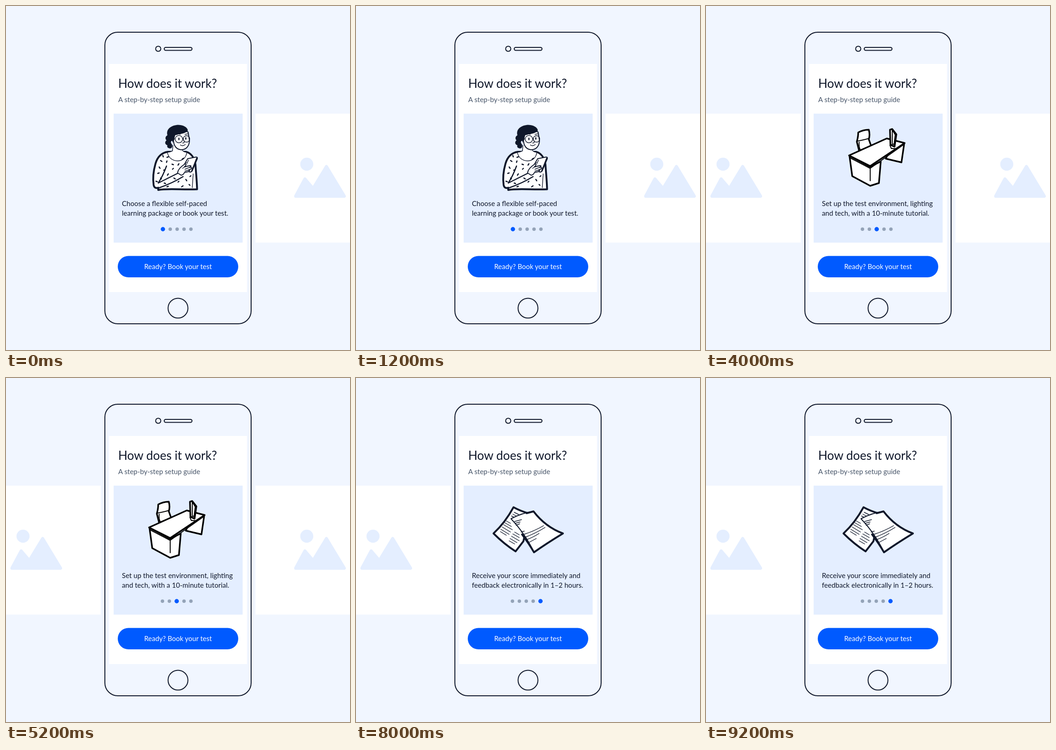
An HTML page for the animation above (10 s loop, 748 by 748 pixels).

```html
<!DOCTYPE html>
<html lang="en">
<head>
<meta charset="utf-8">
<title>How does it work?</title>
<style>
  html, body { margin: 0; width: 100%; height: 100%; overflow: hidden; background: #f1f6ff; }
  svg { display: block; width: 100%; height: 100%; }
  text { font-family: Lato, sans-serif; font-size: 15.1px; fill: #0f172a; }
  .title { font-size: 26.3px; }
  .sub { fill: #475569; }
  .cta { font-size: 15px; fill: #fff; text-anchor: middle; }

  .frame { fill: none; stroke: #0f172a; stroke-width: 2; }
  .ink { fill: none; stroke: #0f172a; stroke-width: 2; stroke-linecap: round; stroke-linejoin: round; }
  .black { stroke: #000; }
  .paper { fill: #fff; }
  .solid { fill: #0f172a; }
  .fine { stroke-width: 1.4; }
  .firm { stroke-width: 3; }
  .bold { stroke-width: 4; }
  .dot { fill: #94a3b8; }
  .dot.on { fill: #005aff; }

  .slide { visibility: hidden; animation: slide 10s step-end infinite; animation-delay: calc(var(--n) * 2s - 10s); }
  .prev { animation: prev 10s step-end infinite; }
  .next { animation: next 10s step-end infinite; }
  @keyframes slide { 0% { visibility: visible; } 20%, 100% { visibility: hidden; } }
  @keyframes prev { 0% { visibility: hidden; } 20%, 100% { visibility: visible; } }
  @keyframes next { 0% { visibility: visible; } 80%, 100% { visibility: hidden; } }
</style>
</head>
<body>
<svg viewBox="0 0 748 748">
  <defs>
    <g id="placeholder">
      <rect x="-74.500" y="234" width="280.500" height="280.500" fill="#fff"/>
      <g fill="#e4eeff">
        <circle cx="37" cy="344" r="14.2"/>
        <path d="M13 413.5L33 376.2L50.7 397L79.7 349.3L118.5 413.5Z" stroke="#e4eeff" stroke-width="7" stroke-linejoin="round"/>
      </g>
    </g>
  </defs>

  <rect width="748" height="748" fill="#f1f6ff"/>
  <use href="#placeholder" class="prev"/>
  <use href="#placeholder" x="617" class="next"/>

  <!-- handset -->
  <rect class="frame" x="215" y="57" width="318" height="634" rx="28"/>
  <circle class="frame" cx="331" cy="93" r="5.6"/>
  <rect class="frame" x="344" y="90" width="60.5" height="6.4" rx="3.2"/>
  <circle class="frame" cx="374" cy="657" r="21.6"/>
  <rect x="224" y="126" width="300" height="496" fill="#fff"/>
  <text class="title" x="243.9" y="177.8">How does it work?</text>
  <text class="sub" x="243.9" y="208.8">A step-by-step setup guide</text>
  <rect x="234" y="234" width="280.5" height="280.5" fill="#e4eeff"/>
  <rect x="243" y="543.5" width="262" height="46.5" rx="23.2" fill="#005aff"/>
  <text class="cta" x="374" y="572.3">Ready? Book your test</text>

  <!-- person with a phone -->
  <g class="slide" data-lines="Choose a flexible self-paced|learning package or book your test.">
    <path class="ink paper bold" d="M352 317C338 319 329 329 325 343C321 357 319 375 321 389C322 395 326 397 331 395L331 400C350 396 385 400 415.500 398.500C415 380 413 362 412 345C410 330 402 319 391 317Z"/>
    <path class="ink paper fine" d="M363 303L362 315Q356 318 351 318C354 342 391 344 393 318Q386 318 383 313L380 306"/>
    <path class="ink paper" d="M365 282C362 300 368 311 380 312.500C391 313 398 306 399 293L396 274L375 268Z"/>
    <path class="solid" d="M351 281C347 267 361 258.500 375 258.500C389 259 397 267 395 272C387 279 374 278 368 281C366 286 367 291 364 294C360 290 356 296 361 301C363 306 360 311 355 309.500C350 308 350 305 351 303C345 301 345 295 349 292C345 288 347 283 351 281Z"/>
    <g class="ink fine">
      <circle cx="376" cy="289.500" r="8"/><circle cx="392.500" cy="289" r="7"/>
      <path d="M367 289L358 289M384 288L386 288M370 280Q375 277 379 279M389 279L396 278M386 291Q390 298 384 298M379 302Q384 306 390 301M358 294Q362 290 363 296"/>
      <path d="M376 287.500v3M391 286.500v3" stroke-width="2.600"/>
    </g>
    <g class="ink">
      <path stroke-width="2.500" d="M349 348Q341 370 331 385L373 364M334 395Q362 385 385 371"/>
      <path class="fine" d="M407 365L405 395"/>
      <path stroke-width="2.400" d="M341 325l1 3M350 329l3-1M336 336l3 2M349 340l1-3M361 344l3 1M374 346l2-3M333 350l2 3M343 357l3-1M362 355l2-2M330 364l3-1M336 374l2 2M351 368l2-3M326 381l3 1M344 385l3 1M365 374l3 2M350 393l3-1M374 383l2-2M382 393l3-2M391 377l2 3M400 371l2-2M398 388l2 2M383 333l3-2"/>
    </g>
    <path class="ink paper" d="M395 332L413 328.500Q417 328 416 332L405 358Q402 363 397 360L384 351Z"/>
    <path class="ink firm" d="M415 331L404 359"/>
    <path class="ink fine" d="M391 340l3 2M397 335l-3 6"/>
    <path class="ink paper" d="M373 363C374 355 380 349 390 343Q394 344 388 350L400 347Q405 348 399 351Q406 350 403 354L396 357Q402 357 397 360L388 362Q386 367 381 368Z"/>
    <path class="ink fine" d="M388 350L384 353M399 351L389 355M396 357L389 359"/>
  </g>

  <!-- phone with a face -->
  <g class="slide" data-lines="Check your face ID, voice ID and|upload identification documentation.">
    <path class="ink paper bold" d="M328 275Q360 271.500 388 272.500Q395 273 398 281L422 368Q425 379 416 380.500L353 384Q347 384 345 378L324 291Q321 278 328 275Z"/>
    <path class="ink" d="M336 276Q329 278 331 288L351 373Q353 379 359 379L412 376Q421 375 420 370"/>
    <path class="ink" d="M354 282h1M358 282.500L368 282"/>
    <path class="ink" d="M392 369C391 374 382 373 382 368Q384 366 386 367"/>
    <g class="ink fine">
      <circle cx="365" cy="320.500" r="9.300"/><circle cx="389" cy="319.500" r="8.800"/>
      <path d="M356 320L333 318M374 320Q377 316 380 319M397 317L399 316M374 329Q379 333 380 328Q382 325 379 323"/>
      <path stroke-width="2" d="M359 312Q362 308 367 310M384 310Q388 309 392 313M372 337Q376 343 382 337"/>
      <path stroke-width="3" d="M366 319v3M386 318v3"/>
    </g>
  </g>

  <!-- desk -->
  <g class="slide" data-lines="Set up the test environment, lighting|and tech, with a 10-minute tutorial.">
    <g fill="#fff" stroke="#000" stroke-width="3.500" stroke-linejoin="round">
      <path d="M331 275Q342 269 354 269Q357 280 354 290L359 304L333 315L328 295Q331 284 331 275Z"/>
      <path d="M391 332L425 340L431 299L400 312Z"/>
      <path d="M312 326L318 370L357 391L376 385L380 338L357 350Z"/>
      <path d="M311 325L393 288L432 298L357 348Z"/>
      <path d="M400 269L405 267.500L414 279L410 306L401 302Z"/>
    </g>
    <path class="ink black" d="M328 294Q344 291 354 288M333 296Q332 308 336 313M313 330L357 353L429 302M357 353L357 380M405 269L405 299M400 303L403 310L411 310M401 302L409 300"/>
    <path class="ink black firm" d="M407 272L412 280L409 304"/>
  </g>

  <!-- laptop -->
  <g class="slide" data-lines="Take the four part test – reading,|writing, listening and speaking.">
    <path class="ink paper firm" d="M303 298L307 294L380 292.500L394 355L440 366L440 370L381 396L321 373L316 367Z"/>
    <path class="ink firm" d="M318 370L394 356M321 371L381 391L440 367"/>
    <path class="ink" d="M306 297L321 367M380 295Q343 318 331 356"/>
    <path class="ink fine" d="M337 371L395 360L415 364L366 379Z"/>
    <path class="ink firm" d="M370 265L371 275M396 271L392 282M418 285L408 298M434 303Q425 306 418 313M416 330.500L436 331"/>
  </g>

  <!-- two sheets -->
  <g class="slide" data-lines="Receive your score immediately and|feedback electronically in 1–2 hours.">
    <path class="ink paper bold" d="M342.500 281Q357 289 377 295L364 355L347 377Q322 361 299 338Q324 315 342.500 281Z"/>
    <path class="ink fine" d="M344 292l10 5M341 296l9 5M338 300l8 4M327 311l9 5M324 315l14 8M321 319l19 11M318 324l18 11M315 329l18 11M314 334l13 8M345 335l10 6M341 339l14 8M338 344l17 10M335 349l15 9M333 354l12 7"/>
    <path class="ink paper" d="M337 306Q362 293 386 290Q412 324 450 338Q414 360 387 379Q369 340 337 306Z"/>
    <path class="ink bold" d="M371 294L386 290Q412 324 450 338Q414 360 387 379Q376 360 361 340"/>
    <path class="ink fine" d="M345 312l15-4M346 316l11-3M348 320l8-3M359 335l7-2M362 341Q388 333 408 321M366 347Q390 338 411 325M370 352Q386 346 398 338M377 357l15-8"/>
  </g>
</svg>
<script>
  const NS = 'http://www.w3.org/2000/svg';
  const add = (parent, tag, attrs) => {
    const el = parent.appendChild(document.createElementNS(NS, tag));
    for (const key in attrs) el.setAttribute(key, attrs[key]);
    return el;
  };

  // Captions and pager: the larger active dot nudges those after it.
  document.querySelectorAll('.slide').forEach((slide, n) => {
    slide.style.setProperty('--n', n);
    slide.dataset.lines.split('|').forEach((line, row) => {
      add(slide, 'text', { x: 252, y: 434.9 + row * 20.7 }).textContent = line;
    });
    for (let i = 0; i < 5; i++) {
      const on = i === n;
      const nudge = on ? 0.95 : i > n ? 1.9 : 0;
      add(slide, 'circle', {
        class: on ? 'dot on' : 'dot',
        cx: 340.2 + 15 * i + nudge, cy: 485.3, r: on ? 4.7 : 3.75
      });
    }
  });
</script>
</body>
</html>
```
